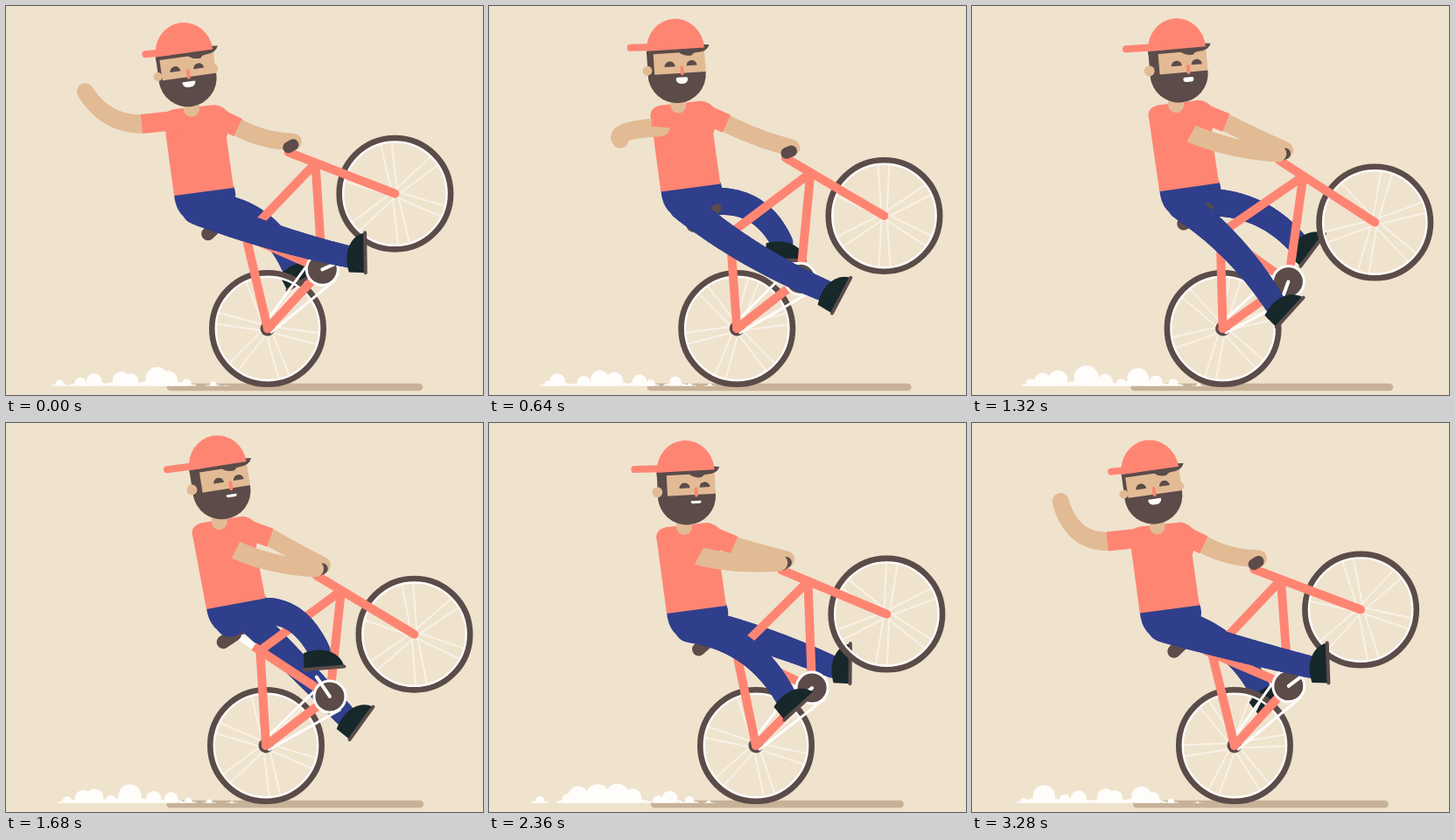
These frames come from a looping animation (545 by 445 pixels, 3.32 s). An HTML page with a canvas:

```html
<!DOCTYPE html>
<html lang="en">
<head>
<meta charset="utf-8">
<title>Wheelie</title>
<style>
  html, body { margin: 0; width: 100%; height: 100%; overflow: hidden; background: #efe3ce; }
  canvas { display: block; }
</style>
</head>
<body>
<canvas id="stage" width="545" height="445"></canvas>
<script>
const ctx = document.getElementById('stage').getContext('2d');
const STEP = 40, COUNT = 83, RAD = Math.PI / 180, TAU = Math.PI * 2;
const C = {
  bg: '#efe3ce', coral: '#ff8573', skin: '#e2bb95', dark: '#5b4b49', navy: '#2f3f8c',
  shoe: '#17282a', shadow: '#c7b299', white: '#fffdfa', spoke: '#f9f1e6'
};

// Key poses: step, rear hub x, bike angle, waist x, waist y, head tilt, crank angle
const pose = track([
  [0, 299, -46.7, 192, 217, -8, -24],
  [8, 291, -42.9, 195, 214, -7, 27],
  [24, 279, -34.1, 198, 212, -1, 37],
  [42, 297, -36.9, 229, 213, -9, 236],
  [59, 305, -45.2, 203, 218, -3, 500],
  [72, 308, -51.1, 190, 222, -8, 481]
], [COUNT, 0, 0, 0, 0, 0, 720]);

// Slope at the middle key, flat at turning points.
function slope(a, b, c, i) {
  const hl = b[0] - a[0], hr = c[0] - b[0];
  const l = (b[i] - a[i]) / hl, r = (c[i] - b[i]) / hr;
  if (l * r <= 0) return 0;
  const wl = 2 * hr + hl, wr = hr + 2 * hl;
  return (wl + wr) / (wl / l + wr / r);
}

// Smooth interpolation of keys that repeat, advanced by `lap`, every loop.
function track(rows, lap) {
  const shift = (row, n) => row.map((v, i) => v + n * lap[i]);
  const keys = [shift(rows.at(-1), -1), ...rows, shift(rows[0], 1), shift(rows[1], 1)];
  return step => {
    const k = keys.findLastIndex(row => row[0] <= step);
    const [a, b, c, d] = keys.slice(k - 1, k + 3);
    const h = c[0] - b[0], u = (step - b[0]) / h, w = 1 - u;
    return b.map((v, i) =>
      v * (1 + 2 * u) * w * w + c[i] * u * u * (3 - 2 * u) +
      h * u * w * (w * slope(a, b, c, i) - u * slope(b, c, d, i))).slice(1);
  };
}

function ease(from, to, step) {
  const u = Math.min(1, Math.max(0, (step - from) / (to - from)));
  return u * u * (3 - 2 * u);
}

function mix(a, b, u) {
  return a.map((v, i) => v + (b[i] - v) * u);
}

function offset([px, py], x, y, deg) {
  const c = Math.cos(deg * RAD), s = Math.sin(deg * RAD);
  return [px + x * c - y * s, py + x * s + y * c];
}

function seeded(seed) {
  return () => (seed = seed * 16807 % 2147483647) / 2147483647;
}

function disc(x, y, r, color) {
  ctx.beginPath();
  ctx.arc(x, y, r, 0, TAU);
  ctx.fillStyle = color;
  ctx.fill();
}

function ring(x, y, r, width, color) {
  ctx.beginPath();
  ctx.arc(x, y, r, 0, TAU);
  ctx.lineWidth = width;
  ctx.strokeStyle = color;
  ctx.stroke();
}

function bar(a, b, width, color, cap = 'round') {
  ctx.beginPath();
  ctx.moveTo(...a);
  ctx.lineTo(...b);
  ctx.lineWidth = width;
  ctx.lineCap = cap;
  ctx.strokeStyle = color;
  ctx.stroke();
}

function shape(d, color) {
  ctx.fillStyle = color;
  ctx.fill(new Path2D(d));
}

function local([x, y], deg, draw) {
  ctx.save();
  ctx.translate(x, y);
  ctx.rotate(deg * RAD);
  draw();
  ctx.restore();
}

// Tapered limb along a quadratic curve.
function limb(a, q, b, from, to, color) {
  const at = u => mix(mix(a, q, u), mix(q, b, u), u);
  const n = 28;
  for (let i = 0; i < n; i++)
    bar(at(i / n), at((i + 1) / n), from + (to - from) * i / n, color);
}

// One puff leaves the tyre per step, swells, drifts left and shrinks.
function drawDust(step) {
  const life = 9.5, drift = 21, floor = 434.5, rand = seeded(11);
  ctx.save();
  ctx.beginPath();
  ctx.rect(0, 380, 545, floor - 380);
  ctx.clip();
  for (let born = 0; born < COUNT; born++) {
    const full = 8 + 16 * rand(), jitter = 14 * rand() - 7;
    const age = (step - born + COUNT) % COUNT;
    if (age >= life) continue;
    const top = full * Math.min(1, (age + 0.5) / 4, (life - age) / 1.5);
    const r = top * 0.56 + 1, x = 252 - drift * age + jitter;
    disc(x, floor - top + r, r, C.white);
    ctx.beginPath();
    ctx.ellipse(x, floor, r * 1.6 + 3, top * 0.3, 0, 0, TAU);
    ctx.fill();
  }
  ctx.restore();
}

function drawWheel([x, y], spin) {
  for (let i = 0; i < 6; i++)
    for (const side of [-1, 1]) {
      const a = spin + i * TAU / 6, e = a + side * 0.11;
      bar([x - side * 3 * Math.sin(a), y + side * 3 * Math.cos(a)],
        [x + 59 * Math.cos(e), y + 59 * Math.sin(e)], 2, C.spoke, 'butt');
    }
  ring(x, y, 59.5, 3, C.white);
  ring(x, y, 63.7, 6.6, C.dark);
  disc(x, y, 5, C.white);
}

function drawShoe(p, deg) {
  local(p, deg, () => {
    shape('M-23 0 L-22 -19 Q-8 -23 3 -20 Q20 -15 23 0 Z', C.shoe);
    bar([-23, 0], [23, 0], 4, C.dark);
  });
}

// The sole follows the pedal circle while the ankle rocks with the crank.
function footAt(bb, bike, crank) {
  const a = (crank - bike) * RAD;
  const deg = bike - 6.75 - 21.5 * Math.cos(a) - 26 * Math.sin(a)
    - 14.75 * Math.cos(2 * a) + 4 * Math.sin(2 * a);
  const hub = offset(bb, 12.5, 8, bike);
  const sole = offset(hub, 38, 0, crank);
  return { sole, deg, ankle: offset(sole, -4, -20, deg) };
}

// The closer the foot, the more the knee bows out.
function drawLeg(hip, { sole, deg, ankle }, reach, bend, width) {
  const dx = ankle[0] - hip[0], dy = ankle[1] - hip[1], d = Math.hypot(dx, dy);
  const k = (reach - d) * bend / d;
  const knee = [hip[0] + dx / 2 + dy * k, hip[1] + dy / 2 - dx * k];
  limb(hip, knee, ankle, width, 25, C.navy);
  drawShoe(sole, deg);
}

function drawBike(rear, bike, step) {
  const spin = step / COUNT * TAU;
  drawWheel(rear, spin * 4 + 0.2);
  drawWheel(offset(rear, 212, 0, bike), spin + 0.35);
  local(rear, bike, () => {
    const hub = [0, 0], bb = [92, -1], head = [175, -90], seat = [60, -91];
    const tube = (a, b, cap) => bar(a, b, 10, C.coral, cap);
    bar([58, -97], [49, -121], 8, C.white, 'butt');
    bar([50, -123], [66, -123], 10, C.dark);
    bar([32, -124], [48, -123], 15, C.dark);
    disc(...hub, 8.5, C.dark);
    for (const side of [-1, 1]) bar([0, 6 * side], [92, 18 * side], 3, C.white);
    tube(seat, head);
    tube([57, -99], bb, 'butt');
    tube(head, bb);
    tube(seat, hub);
    tube(hub, bb);
    tube([163, -121], [212, 0]);
    disc(...bb, 17, C.dark);
    ring(...bb, 18, 3, C.white);
  });
}

function drawHead(p, tilt, turn, mouth) {
  local(p, tilt, () => {
    disc(31 - 5 * turn, 23, 5, C.skin);
    ctx.save();
    ctx.clip(new Path2D('M-33 -4 H33 V29.5 A33 33 0 0 1 -33 29.5 Z'));
    ctx.fillStyle = C.skin;
    ctx.fillRect(-34, -5, 68, 70);
    ctx.fillStyle = C.dark;
    ctx.fillRect(-34, 28.5, 68, 36);
    ctx.fillRect(-34, -5, 5 + 7 * turn, 40);
    ctx.restore();
    shape('M-33 -3 V5 L4 5 Q10 10 18 9 Q20 6 24 6 Q36 6 39 -2 L30 -3 Z', C.dark);
    disc(-33.5, 23.5, 5 + turn, C.skin);
    shape('M-33 1 A33 35 0 0 1 33 1 Z', C.coral);
    bar([-18, -3], [-44 - 14 * turn, -4], 8, C.coral);
    for (const x of [-13 + 11 * turn, 14 + 7 * turn]) {
      ctx.beginPath();
      ctx.arc(x, 20.5, 6, Math.PI, TAU);
      ctx.fillStyle = C.dark;
      ctx.fill();
    }
    const nose = 1.3 + 9.7 * turn;
    bar([nose, 22], [nose, 29], 4, C.coral);
    const lip = 0.6 + 9.6 * turn, w = 15 - 3 * turn, soft = 1 + 3 * turn;
    ctx.beginPath();
    ctx.roundRect(lip - w / 2, 37 - mouth / 2, w, mouth, [soft, soft, 7, 7]);
    ctx.fillStyle = C.white;
    ctx.fill();
  });
}

// Waves beside the body, then reaches across it for the grip.
function drawFrontArm(body, grip, step, turn, reach) {
  const beat = step > COUNT / 2 ? step - COUNT : step;
  const swing = 236 + 32 * Math.cos((beat - 9) / 13 * TAU);
  const shoulder = body(1, -86);
  const cuff = mix(body(-37, -82), body(37, -66), turn);
  const hand = mix(offset(body(-64, -82), 53, 0, swing), [grip[0] - 5, grip[1] - 1], reach);
  hand[1] += 41 * Math.sin(Math.PI * reach);
  const across = [(cuff[0] + hand[0]) / 2 - 6, (cuff[1] + hand[1]) / 2 + 7];
  limb(cuff, mix(body(-78, -82), across, turn), hand, 21, 19, C.skin);
  disc(...shoulder, 10.5, C.coral);
  bar(shoulder, cuff, 22, C.coral, 'butt');
}

function drawBackArm(cuff, grip, bike, turn) {
  const hand = [grip[0] + 3, grip[1] - 5];
  const bend = mix(cuff, hand, 0.5);
  bend[1] += 8 - 7 * turn;
  limb(cuff, bend, hand, 20, 19, C.skin);
  bar(offset(grip, -3, 0, bike + 15), offset(grip, 3, 0, bike + 15), 13, C.dark);
}

function draw(step) {
  const [rx, bike, wx, wy, tilt, crank] = pose(step);
  const back = ease(61, 71, step);
  const turn = ease(10, 22, step) - back;
  const reach = ease(10, 28, step) - back;
  const calm = ease(28, 38, step) - back;
  const lean = turn * Math.min(0, (tilt + 4) * 0.6);
  const rear = [rx, 369], waist = [wx, wy];
  const body = (x, y) => offset(waist, x, y, lean);
  const bb = offset(rear, 92, -1, bike), grip = offset(rear, 170, -124, bike);

  ctx.fillStyle = C.bg;
  ctx.fillRect(0, 0, 545, 445);
  const sway = rx - 299;
  bar([188 + sway * 0.2, 436], [472 - sway * 0.4, 436], 8.5, C.shadow);
  drawDust(step);

  bar(bb, offset(bb, 29, 0, crank + 180), 4, C.white);
  drawLeg(body(48, 13), footAt(bb, bike, crank + 180), 160, 0.65, 32);
  local(waist, lean, () =>
    shape('M0 -2 L68 -11 Q76 8 56 24 Q44 33 28 32 Q2 27 0 -2 Z', C.navy));

  drawBike(rear, bike, step);
  bar(bb, offset(bb, 27, 0, crank), 4, C.white);

  const cuff = body(73 + 4 * turn, -78);
  drawBackArm(cuff, grip, bike, turn);
  drawLeg(body(26, 16), footAt(bb, bike, crank), 172, 0.85, 34);

  bar(body(46, -91), cuff, 22, C.coral, 'butt');
  local(waist, lean, () => {
    shape('M0 0 L68 -9 L60 -66 L66 -90 Q56 -104 46 -104 L20 -101 L0 -99 Q-15 -96 -11 -82 Z', C.coral);
    ctx.fillStyle = C.skin;
    ctx.fillRect(11, -112, 18, 13);
    disc(20, -99, 9, C.skin);
  });

  drawFrontArm(body, grip, step, turn, reach);
  drawHead(body(11.5 + 10 * turn, -164), tilt, turn, 6.5 + 1.5 * turn - 5 * calm);
}

function tick(now) {
  draw(Math.floor(now / STEP) % COUNT);
  requestAnimationFrame(tick);
}
draw(0);
requestAnimationFrame(tick);
</script>
</body>
</html>
```
